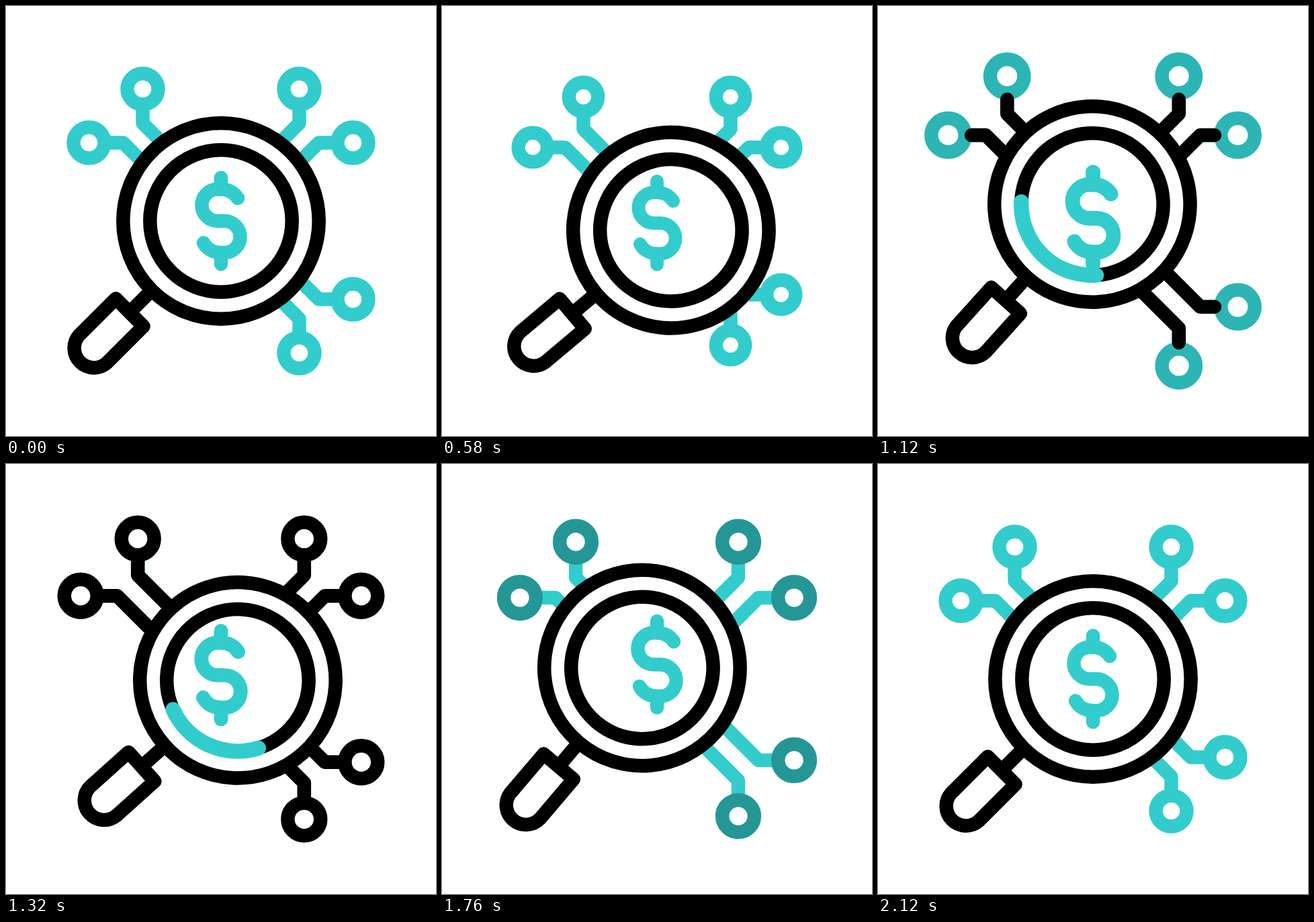
Write an HTML page that moves like this. It is 640 px wide and 640 px high and loops after 2.32 s.

```html
<!DOCTYPE html>
<html lang="en">
<head>
<meta charset="utf-8">
<title>Money search</title>
<style>
  html, body { margin: 0; width: 100%; height: 100%; overflow: hidden; background: #fff; }
  svg { display: block; width: 100%; height: 100%; stroke-width: 20.5px; }
  path, circle { fill: none; stroke-linecap: round; stroke-linejoin: round; }
  .teal { stroke: #33cccc; }
  .black { stroke: #000; }
  .solid { fill: #fff; }
  .rod { stroke-linecap: butt; }
  #shine { stroke-width: 22.5px; }
</style>
</head>
<body>
<svg viewBox="0 0 640 640">
  <g id="net"></g>
  <g class="lens">
    <path class="black rod" d="M-94 94L-136 136"/>
    <path class="black solid" d="M-156.6 115.6L-211.2 170A29.2 29.2 0 0 0 -170 211.2L-115.4 156.8Z"/>
    <circle class="black solid" r="145.7"/>
  </g>
  <g id="dollar">
    <path class="teal" d="M0 -64.5V-47M0 47V64
      M25 -34C19 -43 10 -47.2 0 -47.2H-5A23.6 23.6 0 0 0 -5 0H5
      A23.6 23.6 0 0 1 5 47.2H0C-12 47.2 -21 41.5 -26 32.5"/>
  </g>
  <g class="lens">
    <circle class="black" r="105.7"/>
    <path class="teal" id="shine"/>
  </g>
</svg>
<script>
const LOOP = 2320, STEP = 20, START = 200, END = 2120;
const $ = id => document.getElementById(id);
const all = selector => document.querySelectorAll(selector);

// Eased 0 to 1 between times a and b.
function ease(t, a, b) {
  const p = Math.min(1, Math.max(0, (t - a) / (b - a)));
  return p * p * (3 - 2 * p);
}

// Eased moves from the rest value through [time, value] keys.
function track(rest, ...keys) {
  return t => {
    let time = START, value = rest;
    for (const [next, goal] of keys) {
      if (t < next) return value + (goal - value) * ease(t, time, next);
      [time, value] = [next, goal];
    }
    return value;
  };
}

const netScale = track(1, [400, .915], [1180, 1.1], [1540, .989], [1700, 1.043], [2000, 1]);
const orbitRadius = track(0, [560, 25], [1480, 25], [1760, 27.6], [END, 0]);
const tilt = track(0, [530, 4.8], [710, 4.8], [875, -4.8], [1000, -4.8], [1440, 4.8], [1730, -4.8], [END, 0]);
const dollarY = track(0, [440, 8], [820, -8], [1120, -4], [1540, -7.5], [1760, -21.5], [END, 0]);
const dollarScale = track(1, [820, .948], [1120, 1.065], [1540, .974], [1760, 1]);

// The lens speeds up for half a second, then circles at a steady rate.
function orbitAngle(t) {
  const rate = .4835, u = Math.max(0, t - 317), spinUp = 500;
  return rate * (u < spinUp ? u * u / (2 * spinUp) : u - spinUp / 2);
}

function polar(degrees, r) {
  const a = degrees * Math.PI / 180;
  return [r * Math.cos(a), r * Math.sin(a)];
}

const wire = "M-50 -79L-116.5 -145.5V-165";
const branch = `
  <path class="teal" d="${wire}"/>
  <circle class="node" cx="-116.5" cy="-196.5" r="23"/>
  <path class="black pulse" pathLength="1" d="${wire}"/>`;
$("net").innerHTML = [0, 90, 180].map(turn =>
  `<g transform="rotate(${turn})">${branch}<g transform="matrix(0 1 1 0 0 0)">${branch}</g></g>`).join("");

function draw(t) {
  const s = netScale(t);
  $("net").setAttribute("transform", `translate(320 320) scale(${s})`);
  $("net").style.strokeWidth = 20.5 / s + "px";

  const light = 1 - ease(t, 1080, 1270) + ease(t, 1600, 1842);
  const color = `rgb(${[51, 204, 204].map(c => Math.round(c * light))})`;
  all(".node").forEach(n => n.style.stroke = color);

  const tail = ease(t, 1120, 1690);
  const pulseHead = ease(t, 840, 1110), shineHead = ease(t, 840, 1220);
  all(".pulse").forEach(p => {
    p.style.display = pulseHead > tail ? "" : "none";
    p.setAttribute("stroke-dasharray", `${pulseHead - tail} 3`);
    p.setAttribute("stroke-dashoffset", -tail);
  });

  const r = 105.7, along = k => polar(185 - 115 * k, r);
  $("shine").style.display = shineHead > tail ? "" : "none";
  $("shine").setAttribute("d", `M${along(tail)}A${r} ${r} 0 0 0 ${along(shineHead)}`);

  const [x, y] = polar(orbitAngle(t), orbitRadius(t));
  const place = `translate(${320 + x} ${320 + y}) rotate(${tilt(t)})`;
  all(".lens").forEach(l => l.setAttribute("transform", place));

  $("dollar").setAttribute("transform", `translate(320 ${320 + dollarY(t)}) scale(${dollarScale(t)})`);
}

const start = performance.now();
function frame() {
  const t = (performance.now() - start) % LOOP;
  draw(t - t % STEP);
  requestAnimationFrame(frame);
}
frame();
</script>
</body>
</html>
```
